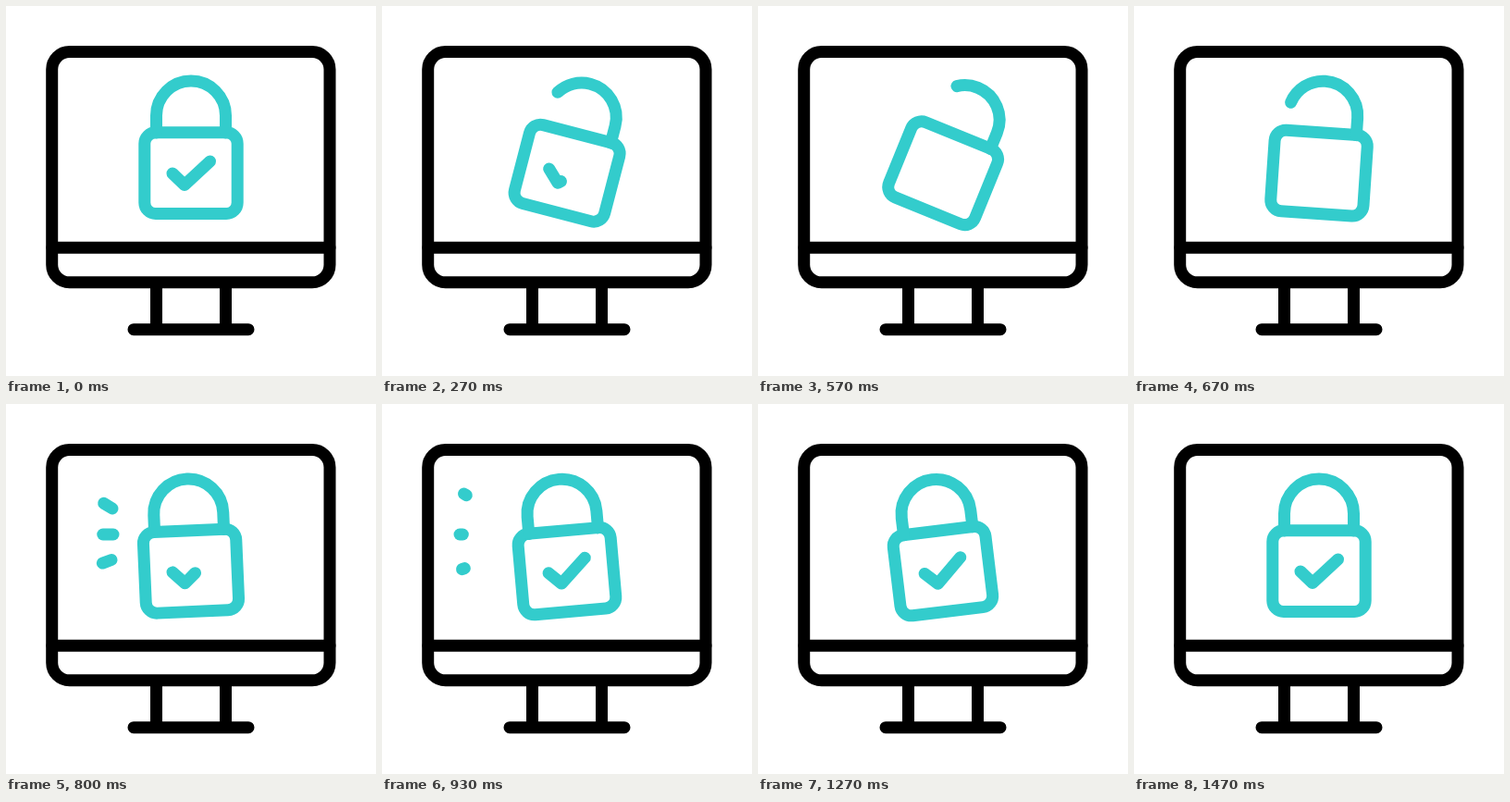
An HTML page for the animation above (1670 ms loop, 400 px wide and 400 px high).

```html
<!DOCTYPE html>
<html lang="en">
<head>
<meta charset="utf-8">
<title>Screen lock</title>
<style>
  html, body { margin: 0; width: 100%; height: 100%; overflow: hidden; background: #fff; }
  svg { display: block; width: 100%; height: 100%; fill: none; stroke-width: 13; stroke-linecap: round; stroke-linejoin: round; }
</style>
</head>
<body>
<svg viewBox="0 0 400 400">
  <g stroke="#000">
    <rect x="49.7" y="49.5" width="300.3" height="249.3" rx="19"/>
    <path d="M50 261.3H350M162.5 300V349M237.5 300V349M138 349.7H262"/>
  </g>
  <g stroke="#33cccc">
    <g id="lock">
      <rect x="149.8" y="136.8" width="100.4" height="87.7" rx="12"/>
      <path id="shackle" pathLength="1" d="M162.5 137V118.5A37.5 37.5 0 0 1 237.5 118.5V137"/>
      <path id="check" pathLength="1" d="M180 181L193 193.5L220.5 168"/>
    </g>
    <path class="ray" pathLength="1" d="M115 113L88.5 97"/>
    <path class="ray" pathLength="1" d="M116 141H84"/>
    <path class="ray" pathLength="1" d="M114 168.5L86.5 178.7"/>
  </g>
</svg>
<script>
  const LOOP = 1670, FPS = 30;
  const lock = document.getElementById('lock');
  const shackle = document.getElementById('shackle');
  const check = document.getElementById('check');
  const rays = document.querySelectorAll('.ray');

  // Keys are [tick, value] pairs, eased in and out between neighbours.
  const tracks = {
    angle: [[3, 0], [14, 33.8], [21.6, 0], [27, -6], [33, 7], [39, -8], [44, 0]],
    open: [[0, 0], [14, 0.42], [25.6, 0]],
    check: [[0, 1], [14, 0], [20, 0], [27, 1]],
    rayTail: [[24, 0], [29, 1]],
    rayTip: [[22, 0], [27, 1]]
  };

  function valueAt(keys, tick) {
    if (tick <= keys[0][0]) return keys[0][1];
    for (let i = 1; i < keys.length; i++) {
      const [t0, v0] = keys[i - 1], [t1, v1] = keys[i];
      if (tick <= t1) {
        const x = (tick - t0) / (t1 - t0);
        return v0 + (v1 - v0) * x * x * (3 - 2 * x);
      }
    }
    return keys[keys.length - 1][1];
  }

  function trim(path, from, to) {
    path.style.display = to > from ? '' : 'none';
    path.setAttribute('stroke-dasharray', `${Math.max(to - from, 0)} 2`);
    path.setAttribute('stroke-dashoffset', -from);
  }

  function draw(now) {
    // Ticks start on times rounded to 10 ms.
    const tick = Math.floor((now % LOOP + 4) * FPS / 1000);
    const at = name => valueAt(tracks[name], tick);
    lock.setAttribute('transform', `rotate(${at('angle')} 200 181)`);
    trim(shackle, at('open'), 1);
    trim(check, 0, at('check'));
    rays.forEach(ray => trim(ray, at('rayTail'), at('rayTip')));
  }

  const start = performance.now();
  function loop() {
    draw(performance.now() - start);
    requestAnimationFrame(loop);
  }
  loop();
</script>
</body>
</html>
```
